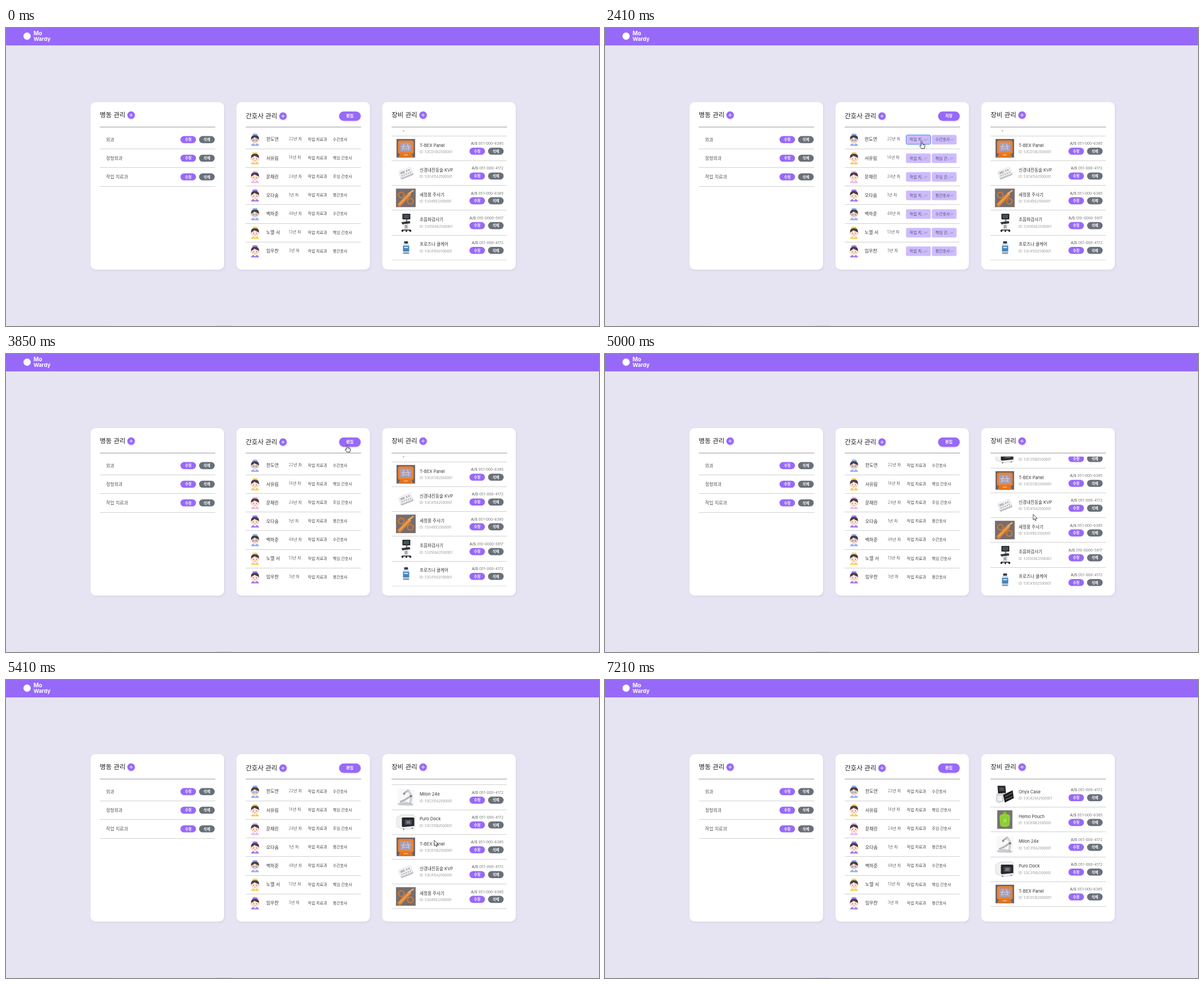
Write an HTML page that moves like this. It is 1055 by 531 pixels and loops after 7.28 s.

```html
<!DOCTYPE html>
<html lang="ko">
<head>
<meta charset="utf-8">
<style>
html, body { margin: 0; width: 100%; height: 100%; overflow: hidden; background: #e6e4f3; }
svg { display: block; }
text { font-family: Inter, "Noto Sans CJK KR", "Noto Sans CJK JP", "Noto Sans CJK", sans-serif; white-space: pre; }
</style>
</head>
<body>
<svg id="stage" width="1055" height="531" viewBox="0 0 1055 531"></svg>
<script>
const PURPLE = '#9769f9', GRAY = '#697079';
const PITCH = 33.15, ITEM = 44.2, LOOP = 7280;

// y is the vertical middle of the text
const text = (x, y, s, size, fill = '#333', weight = 400, anchor = 'start') =>
  `<text x="${x}" y="${y + size * .37}" font-size="${size}" fill="${fill}" font-weight="${weight}" text-anchor="${anchor}">${s}</text>`;
const rect = (x, y, w, h, fill, r = 0, more = '') =>
  `<rect x="${x}" y="${y}" width="${w}" height="${h}" rx="${r}" fill="${fill}" ${more}/>`;
const circle = (x, y, r, fill) => `<circle cx="${x}" cy="${y}" r="${r}" fill="${fill}"/>`;
const path = (d, fill, stroke = 'none', width = 1) =>
  `<path d="${d}" fill="${fill}" stroke="${stroke}" stroke-width="${width}" stroke-linecap="round" stroke-linejoin="round"/>`;
const rule = (x, y, w, color = '#d0d0d2') => rect(x, Math.floor(y), w, 1, color);
const at = (x, y, body) => `<g transform="translate(${x} ${y})">${body}</g>`;
const pill = (cx, cy, w, h, label, size, fill = PURPLE) =>
  rect(cx - w / 2, cy - h / 2, w, h, fill, h / 2) + text(cx, cy, label, size, '#fff', 700, 'middle');
const actions = (x, y) => pill(x, y, 27.6, 12.6, '수정', 6.3) + pill(x + 33.2, y, 27.8, 12.6, '삭제', 6.3, GRAY);

const card = (x, title, titleY, plusX) =>
  rect(x, 132, 237.5, 298.5, '#fff', 9, 'filter="url(#shadow)"') +
  text(x + 16.5, titleY, title, 11.5, '#222') +
  `<g filter="url(#shadow)">${circle(plusX, titleY, 6.7, PURPLE)}</g>` +
  path(`M${plusX - 2.7} ${titleY}h5.4m-2.7 -2.7v5.4`, 'none', '#fff', .9) +
  rule(x + 16.5, 176, 205.3, '#98989a');

// ---- wards
const wards = ['외과', '정형외과', '작업 치료과'].map((name, i) => {
  const y = 198.9 + i * PITCH;
  return text(178, y - .3, name, 8, '#555', 300) + actions(324.2, y) + rule(167, y + 16.8, 205.3);
}).join('');

// ---- nurses
const BLUE = '#8fb0f5', YELLOW = '#f8d04e', PINK = '#eeb5ef', VIOLET = '#a07bee';
const nurses = [
  ['한도연', 22, 0, BLUE], ['서유림', 14, 1, YELLOW], ['문채린', 24, 2, PINK], ['오다솜', 1, 3, VIOLET],
  ['백하준', 48, 0, BLUE], ['노엘 서', 13, 1, YELLOW], ['임우찬', 3, 3, VIOLET]
];
const ranks = ['수간호사', '책임 간호사', '주임 간호사', '평간호사'];
const shortRanks = ['수간호사', '책임 간...', '주임 간...', '평간호사'];
const rowY = i => 198.4 + i * PITCH;

const avatar = (color, glasses) =>
  path('M-7 11C-6.5 7.5 -4 6.5 0 6.5S6.5 7.5 7 11z', color) +
  path('M-2.5 6.5L0 9.5L2.5 6.5z', '#fff') +
  path('M-7 1C-8 -6 -4.5 -8.5 0 -8.5S8 -6 7 1z', '#4b3f47') +
  circle(-6.6, 1.2, 1.4, '#f6cdb6') + circle(6.6, 1.2, 1.4, '#f6cdb6') +
  path('M-6.3 -1C-4 -2 -2 -3 -1 -4.5C1 -3 4 -2 6.3 -1C7 4 4 7.3 0 7.3S-7 4 -6.3 -1z', '#fde5d8') +
  path('M-4 -7.4L-4.6 -10Q0 -11.6 4.6 -10L4 -7.4Q0 -8.6 -4 -7.4z', color) +
  circle(-2.7, 1, .75, '#463b40') + circle(2.7, 1, .75, '#463b40') +
  circle(-4.2, 3.2, 1.1, '#fbc5b8') + circle(4.2, 3.2, 1.1, '#fbc5b8') +
  path('M-1 4.2Q0 5.2 1 4.2', 'none', '#d06a62', .7) +
  (glasses ? path('M-4.8 1a2.1 2.1 0 1 0 4.2 0a2.1 2.1 0 1 0 -4.2 0M.6 1a2.1 2.1 0 1 0 4.2 0a2.1 2.1 0 1 0 -4.2 0', 'none', '#6b7fb8', .6) : '');

const nurseBase = nurses.map(([, , , color], i) =>
  at(443, rowY(i) + .5, avatar(color, color === BLUE)) +
  (i < 6 ? rule(426.5, rowY(i) + 17.1, 205) : '')).join('');
const labels = (name, years, y, dx) =>
  text(463 - dx, y, name, 8, '#333') + text(503 - dx, y - .7, years + '년 차', 7, '#555', 300);
const viewRows = nurses.map(([name, years, rank], i) => {
  const y = rowY(i);
  return labels(name, years, y, 0) + text(537, y - .2, '작업 치료과', 7, '#444') + text(581.5, y - .2, ranks[rank], 7, '#444');
}).join('');
const select = (x, y, label) =>
  rect(x, y - 8.4, 44, 17, '#cdbbfd', 2.5) + text(x + 6.3, y, label, 7, '#55506a') +
  path(`M${x + 33} ${y - 1}l2.5 2.5l2.5 -2.5`, 'none', '#77708c', .7);
const editRows = nurses.map(([name, years, rank], i) => {
  const y = rowY(i);
  return labels(name, years, y, 1) + select(535.5, y + .4, '작업 치...') + select(581.5, y + .4, shortRanks[rank]);
}).join('');

// ---- equipment pictures, centred on 0,0
const pics = {
  cases: path('M-13 -16H1L2 -3L-12 -2z', '#242427') + rect(-10, -13, 9, 6, '#4b4c50') +
    path('M-15 -2L-1 -3L-2 12L-10 15L-16 12z', '#d3d5d8') + rect(-13, 2, 8, 9, '#f1f1f3', 1) +
    path('M-3 0L14 -8L16 6L0 14z', '#1c1c1f') + path('M1 3l12 -6M2 8l12 -5', 'none', '#77787c', 1.1),
  pouch: rect(-13.5, -16.5, 27, 33, '#777275') + rect(-3, -14, 6, 7, '#7ebd29', 2) +
    path('M-7 -9Q0 -11 7 -9Q10 -7 9 0L8 11Q0 15 -8 11L-9 0Q-10 -7 -7 -9z', '#91d338') +
    path('M-5 -5v14M0 -6v16M5 -5v14', 'none', '#7fc32b', 1) + circle(0, 2, 3, '#a7df57'),
  arm: rect(-15, -15, 30, 30, '#f8f8f9') + path('M-15 11L0 8L14 12L11 15L-12 14z', '#c9cbcf') +
    path('M8 10L10 -3L4 -12L-3 -7M10 -3L-2 5L-9 8', 'none', '#b4b8be', 3.5) +
    path('M8 9L10 -3L4 -11', 'none', '#e9eaee', 1.5) + circle(9, -2, 2, '#72767d') + circle(-3, -6, 1.8, '#858990'),
  sterilizer: path('M-16 -8L-8 -13H13L16 -10V9L12 12L-5 12.5L-16 8z', '#f0f0f2', '#c6c8cc', .7) +
    path('M-7 -7Q-7 -8 -5 -8H14L15 -6V7L-5 9Q-7 9 -7 7z', '#25272b') +
    rect(-2, -4, 13, 9, '#4a4d54', 2) + rect(1, -2, 7, 5, '#777b84', 1) +
    rect(-5, 11.5, 2, 2.2, '#666') + rect(10, 10.5, 3, 1.2, '#666'),
  tablet: rect(-16.5, -16.5, 33, 33, '#676267') + rect(-14, -14, 28, 24, '#ec812c', 4) + path('M-10 9H10L13 16H-13z', '#e17422') +
    rect(-10.5, -10, 21, 16, '#a79cb4', 2) + path('M-6 3L-3 -8M6 3L3 -8M-8 -3H8M-5 1H5', 'none', '#d9d4e5', 1.1) +
    rect(-4, 11, 8, 2, '#f6ae6b', 1),
  stimulator: `<g transform="rotate(-22)">${rect(-12, -7, 24, 15, '#bfc1c5', 2)}${rect(-12, -8, 24, 13, '#eeeef0', 2)}` +
    rect(-9, -5, 8, 4, '#b6bbc2') +
    [0, 1, 2, 3, 4].map(i => circle(-8 + i * 4, 2, 1, i % 2 ? '#e48475' : '#9398a0')).join('') +
    circle(3, -3, 1.2, '#8e939c') + circle(7, -3, 1.2, '#8e939c') + '</g>',
  syringe: rect(-17.5, -16.5, 35, 33, '#756d6e') + path('M-11 12L6 -6', 'none', '#d98236', 7) +
    path('M-11 11L7 -7', 'none', '#eda660', 2) + path('M6 -8L13 -13', 'none', '#e8b877', 2.5) +
    path('M-13 -5a5 5 0 1 0 10 0a5 5 0 1 0 -10 0M3 6a5 5 0 1 0 10 0a5 5 0 1 0 -10 0', 'none', '#d27a34', 2.2),
  ultrasound: rect(-6, -16, 14, 10, '#202124', 1) + rect(-4, -14.5, 10, 7, '#47505a') + rect(0, -6, 3, 5, '#888') +
    path('M-8 -1L7 -3L8 1L-6 3z', '#35373b') + rect(-3, 2, 8, 10, '#e5e6e8', 1) + rect(-2, 4, 5, 6, '#a7abb1') +
    path('M-6 13H8', 'none', '#55575c', 2) + circle(-6, 14.5, 1.8, '#222') + circle(8, 14.5, 1.8, '#222') + circle(1, 15, 1.5, '#222'),
  bottle: rect(-3, -11, 7, 4, '#34434f', 1) + path('M-4 -7H5L6 -4V11H-5V-4z', '#cfdbe6') +
    rect(-5, -3, 11, 10, '#4685bd') + rect(-3, -1, 7, 2, '#dcebf6') + rect(-5, 9, 11, 2.5, '#8095a6', 1)
};

const PHONE_A = '051-000-4172', PHONE_B = '051-000-6385', PHONE_C = '010-0000-5917';
const items = [
  ['Onyx Case', '53C425A2500001', PHONE_A, 'cases'],
  ['Hemo Pouch', '53CB18E2500001', PHONE_B, 'pouch'],
  ['Milon 24e', '53C315A2500001', PHONE_A, 'arm'],
  ['Puro Dock', '53C315B2500001', PHONE_A, 'sterilizer'],
  ['T-BEX Panel', '53CD13E2500001', PHONE_B, 'tablet'],
  ['신경내진동술 KVP', '53C415A2500001', PHONE_A, 'stimulator'],
  ['세정용 주사기', '53341EE2500001', PHONE_B, 'syringe'],
  ['초음파검사기', '53350AE2500001', PHONE_C, 'ultrasound'],
  ['프로즈나 쿨케어', '53C41502500001', PHONE_A, 'bottle']
];
const equipment = items.map(([name, id, phone, pic], i) => {
  const y = 199 + i * ITEM;
  return at(711.3, y + 5.5, pics[pic]) + text(736, y, name, 7.6) + text(736, y + 12, 'ID: ' + id, 5.9, '#777', 300) +
    text(885, y - 3.1, `<tspan fill="#333" font-weight="400">A/S</tspan> ${phone}`, 6.6, '#555', 300, 'end') +
    actions(838.3, y + 10.7) + rule(686, y + 27.6, 205);
}).join('');

const stage = document.getElementById('stage');
stage.innerHTML = `<defs>
  <filter id="shadow" x="-20%" y="-20%" width="140%" height="140%"><feDropShadow dx="1" dy="1.5" stdDeviation="1.5" flood-color="#504878" flood-opacity=".13"/></filter>
  <clipPath id="window">${rect(670, 182.7, 237, 231.1, '#000')}</clipPath></defs>` +
  rect(0, 0, 1055, 531, '#e6e4f3') + rect(0, 0, 1055, 31, PURPLE) +
  circle(37.5, 14.5, 6.5, '#fff') + text(49, 9.3, 'Mo', 10, '#fff', 700) + text(49, 19.8, 'Wardy', 9.5, '#fff', 700) +
  rect(24, 530, 161, 1, '#e8dcdb') + rect(374, 530, 27, 1, '#f2cba8') +
  card(150.5, '병동 관리', 155.2, 222.6) + wards +
  card(410, '간호사 관리', 157, 492.8) + nurseBase +
  `<g filter="url(#shadow)">${rect(592.5, 148.8, 38.6, 16.6, PURPLE, 8.3)}</g>` +
  `<g id="view">${text(611.8, 156.8, '편집', 7, '#fff', 700, 'middle')}${viewRows}</g>` +
  `<g id="edit">${text(611.8, 156.8, '저장', 7, '#fff', 700, 'middle')}${editRows}` +
  rect(535.7, 190.6, 43.6, 16.6, 'none', 2.5, 'id="focus" stroke="#4a90f0" stroke-width="1"') + '</g>' +
  card(669.5, '장비 관리', 155.2, 742) + `<g clip-path="url(#window)"><g id="list">${equipment}</g></g>` +
  `<g id="arrow">${path('M0 0V9.6L2.2 7.6L3.8 11L5.3 10.3L3.8 7.1H6.8z', '#fff', '#222', .8)}</g>` +
  `<g id="hand">${path('M-1 7.5V1Q0 -.8 1 1V5L5 5.8Q6 6.2 5.8 8L5 13H-.5L-3.6 8.5Q-3.6 6.6 -1 8z', '#fff', '#222', .9)}${path('M2.3 5.5V7M3.9 5.8V7.2', 'none', '#222', .6)}</g>`;

// ---- motion: [time, ...values], linear between keys
const pointer = [
  [390, 797, 498], [600, 700, 400], [810, 595, 240], [960, 560, 188], [1100, 584, 167], [1170, 592, 161],
  [1310, 600, 151], [1450, 599, 156.5], [1590, 597, 159], [2050, 597, 159], [2410, 563.6, 201.5],
  [2620, 519, 238], [2830, 523, 256], [3020, 523, 256], [3570, 603, 156], [3780, 606.5, 161.5],
  [3850, 606.5, 161.5], [4270, 761.8, 286], [5960, 761.8, 286], [6740, 1021, 523]
];
const scroll = [[4930, 167], [5200, 124.4], [5410, 84], [5630, 0]];

function sample(keys, t) {
  if (t <= keys[0][0]) return keys[0].slice(1);
  const i = keys.findIndex(k => k[0] > t);
  if (i < 0) return keys[keys.length - 1].slice(1);
  const a = keys[i - 1], b = keys[i], p = (t - a[0]) / (b[0] - a[0]);
  return a.slice(1).map((v, n) => v + (b[n + 1] - v) * p);
}

const get = id => document.getElementById(id);
const [view, edit, focus, list, arrow, hand] = ['view', 'edit', 'focus', 'list', 'arrow', 'hand'].map(get);
const show = (el, on) => on ? el.removeAttribute('display') : el.setAttribute('display', 'none');
const move = (el, x, y) => el.setAttribute('transform', `translate(${x} ${y})`);

function draw(now) {
  const t = now % LOOP;
  const editing = t >= 1780 && t < 3850;
  const [x, y] = sample(pointer, t);
  const onButton = x > 592 && x < 631 && y > 149 && y < 166;
  const onSelect = editing && x > 535 && x < 626 && y > 190 && (y - 190) % PITCH < 17;
  const visible = t >= 390 && t < 6800, pointing = onButton || onSelect;
  show(view, !editing);
  show(edit, editing);
  show(focus, t >= 2380);
  show(arrow, visible && !pointing);
  show(hand, visible && pointing);
  move(arrow, x, y);
  move(hand, x, y);
  move(list, 0, -Math.round(sample(scroll, t)[0]));
}

const start = performance.now();
function frame() {
  draw(performance.now() - start);
  requestAnimationFrame(frame);
}
frame();
</script>
</body>
</html>
```
